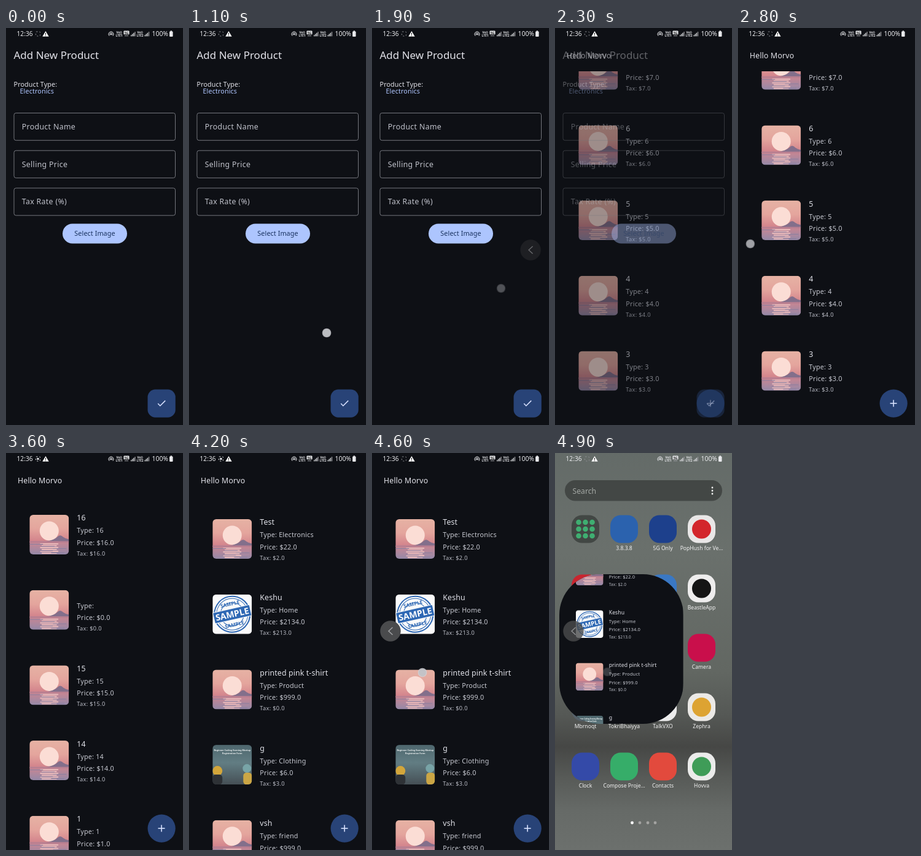
An HTML page with a canvas that plays this animation: 288x642 px, repeating every 5 s.

```html
<!DOCTYPE html>
<html lang="en">
<head>
<meta charset="utf-8">
<title>Product list</title>
<style>
html, body { margin: 0; width: 100%; height: 100%; overflow: hidden; background: #0e1015; }
canvas { display: block; width: 288px; height: 642px; }
</style>
</head>
<body>
<canvas id="stage"></canvas>
<script>
const W = 288, H = 642, LOOP = 5000, BG = '#0e1015';
const canvas = document.getElementById('stage');
const c = canvas.getContext('2d');
const dpr = window.devicePixelRatio || 1;
canvas.width = W * dpr;
canvas.height = H * dpr;

const numbered = n => [String(n), String(n), n, n];
const products = [
  ['Test', 'Electronics', 22, 2, 'sunset'],
  ['Keshu', 'Home', 2134, 213, 'stamp'],
  ['printed pink t-shirt', 'Product', 999, 0],
  ['g', 'Clothing', 6, 3, 'poster'],
  ['vsh', 'friend', 999, 9],
  ...[21, 20, 19, 18, 17, 16].map(numbered),
  ['', '', 0, 0],
  ...[15, 14, 1, 13, 12, 11, 10, 9, 8, 7, 6, 5, 4, 3, 2].map(numbered)
];
const ROW = 121.7, FIRST = 107;

// Tracks: [time, value, ...]
const scrollTrack = [[2800, 2627], [2950, 2540], [3600, 1224], [4200, 0]];
const touches = [
  [[1000, 272, 497, .5], [1100, 224, 493, .8], [1400, 208, 468, .8], [1800, 210, 421, .8], [1900, 210, 421, .2], [2000, 210, 421, 0]],
  [[2700, 20, 349, .3], [2800, 20, 349, .55], [2950, 21, 436, .7], [3100, 22, 480, 0]],
  [[4300, 5, 360, .6], [4400, 45, 358, .8], [4600, 82, 355, .8], [4800, 85, 354, .4], [4900, 85, 354, .13]]
];
const arrows = [
  [[1100, 290, 431, 0], [1300, 260, 415, 1], [1800, 258, 359, 1], [1900, 258, 359, .55], [2000, 270, 359, 0]],
  [[4300, 4, 296, .2], [4400, 18, 292, .8], [4600, 30, 288, 1], [4900, 30, 288, .8]]
];
const closing = [[4700, 0], [4800, .45], [4900, 1]];

const clamp = v => Math.max(0, Math.min(1, v));
const mix = (a, b, p) => a + (b - a) * p;

function sample(track, t) {
  let i = 1;
  while (i < track.length - 1 && t > track[i][0]) i++;
  const a = track[i - 1], b = track[i];
  const p = clamp((t - a[0]) / (b[0] - a[0]));
  return a.slice(1).map((v, k) => mix(v, b[k + 1], p));
}

function text(s, x, y, size, color, spacing = 0, weight = 400, align = 'left') {
  c.font = `${weight} ${size}px "Noto Sans", "Open Sans", sans-serif`;
  c.letterSpacing = spacing + 'px';
  c.textAlign = align;
  c.fillStyle = color;
  c.fillText(s, x, y);
}

function box(x, y, w, h, r) {
  c.beginPath();
  c.roundRect(x, y, w, h, r);
}
function fillBox(x, y, w, h, r, color) {
  box(x, y, w, h, r);
  c.fillStyle = color;
  c.fill();
}
function disc(x, y, r, color) {
  c.beginPath();
  c.arc(x, y, r, 0, 7);
  c.fillStyle = color;
  c.fill();
}
function line(points, color, width) {
  c.beginPath();
  points.forEach(([x, y]) => c.lineTo(x, y));
  c.strokeStyle = color;
  c.lineWidth = width;
  c.stroke();
}
function poly(points, color) {
  c.beginPath();
  points.forEach(([x, y]) => c.lineTo(x, y));
  c.fillStyle = color;
  c.fill();
}
function vertical(h, stops) {
  const g = c.createLinearGradient(0, 0, 0, h);
  stops.forEach(([at, color]) => g.addColorStop(at, color));
  return g;
}

function signal(x) {
  for (let i = 0; i < 4; i++) {
    c.fillStyle = i < 3 ? '#d8d9db' : '#8d8e92';
    c.fillRect(x + i * 2.1, 11.4 - i * 1.8, 1.4, 2 + i * 1.8);
  }
}

function statusBar(focused) {
  const ink = '#e8e9ec';
  text('12:36', 17.5, 13.2, 10.2, ink);
  c.setLineDash([2, 3]);
  box(48.5, 6, 7, 7, 1);
  c.strokeStyle = focused ? ink : '#8d8e92';
  c.lineWidth = 1;
  c.stroke();
  c.setLineDash([]);
  if (focused) disc(52, 9.5, 1.8, ink);
  poly([[64.5, 5], [69.7, 13.8], [59.3, 13.8]], '#fff');
  c.fillStyle = '#111';
  c.fillRect(64, 8, 1, 3);
  c.fillRect(64, 12, 1, 1);

  for (const r of [4, 2]) {
    c.beginPath();
    c.arc(171, 10, r, 2.4, 7.02);
    c.strokeStyle = ink;
    c.lineWidth = 1;
    c.stroke();
  }
  disc(171, 10.2, 1, ink);
  for (const [x, n] of [[184, 1], [218, 2]]) {
    text('Vo))', x, 9, 4.8, ink, 0, 600, 'center');
    text('LTE' + n, x, 13.6, 4.8, ink, 0, 600, 'center');
  }
  fillBox(191.5, 4.5, 9, 6, 1, ink);
  text('5G', 196, 9.5, 5.2, '#222', 0, 700, 'center');
  line([[193, 12.7], [199, 12.7]], '#999a9e', 1);
  signal(203);
  signal(225.5);
  text('100%', 237.5, 13.2, 10.4, ink);
  fillBox(266, 5.5, 5.5, 8.5, 1, ink);
  c.fillRect(267.5, 4.4, 2.5, 1.5);
}

function fab(round) {
  fillBox(230.5, 584.5, 45.2, 45.2, round ? 22.6 : 12.4, '#284377');
  if (round) {
    line([[247.5, 607], [258.5, 607]], '#d9e2ff', 1.6);
    line([[253, 601.5], [253, 612.5]], '#d9e2ff', 1.6);
  } else {
    line([[247.2, 607.3], [250.8, 611], [259.2, 602.6]], '#d9e2ff', 1.5);
  }
}

function formScreen(alpha) {
  c.globalAlpha = alpha;
  c.fillStyle = BG;
  c.fillRect(0, 0, W, H);
  text('Add New Product', 12.5, 50, 17, '#e2e2e9');
  text('Product Type:', 12.5, 94.6, 10.8, '#e2e2e9', .1);
  text('Electronics', 22.5, 105.6, 10.8, '#b0c6ff', .1);
  ['Product Name', 'Selling Price', 'Tax Rate (%)'].forEach((label, i) => {
    const y = 137.5 + i * 60.7;
    box(13, y, 262.5, 44.2, 3.2);
    c.strokeStyle = '#74767d';
    c.lineWidth = 1;
    c.stroke();
    text(label, 25.7, y + 26.5, 12.35, '#bfc1ca', .33);
  });
  fillBox(92, 316.5, 105, 32, 16, '#adc5fe');
  text('Select Image', 144.5, 336.3, 10.8, '#19325f', .08, 500, 'center');
  fab(false);
  c.globalAlpha = 1;
}

const art = {
  sunset() {
    c.fillStyle = vertical(64, [[0, '#e6b2a4'], [.35, '#e4a59d'], [.64, '#d4868d'], [.68, '#c98692'], [1, '#9589a8']]);
    c.fillRect(0, 0, 64, 64);
    disc(32, 26, 15.5, '#fbddd5');
    c.beginPath();
    c.moveTo(27, 43);
    c.quadraticCurveTo(40, 41, 46, 35);
    c.quadraticCurveTo(50, 31, 55, 36);
    c.quadraticCurveTo(59, 39, 64, 39.5);
    c.lineTo(64, 43);
    c.fillStyle = '#836f8b';
    c.fill();
    c.fillStyle = '#b97f91';
    c.fillRect(0, 42.5, 64, 2.5);
    for (let i = 0; i < 6; i++) {
      const w = 30 - i % 2 * 5;
      fillBox(32 - w / 2, 46 + i * 3, w, 2, 1, '#eabbbb');
    }
    for (let i = 0; i < 5; i++) {
      fillBox(i * 19 % 41, 47 + i * 3.5, 22, 1, .5, '#8a7f9f');
    }
  },
  stamp() {
    const blue = '#2e68b4';
    c.fillStyle = '#fafafa';
    c.fillRect(0, 0, 64, 64);
    c.translate(32, 32);
    c.rotate(-.22);
    for (const [r, w] of [[29, 2], [25.5, 1], [19, 1]]) {
      c.beginPath();
      c.arc(0, 0, r, 0, 7);
      c.strokeStyle = blue;
      c.lineWidth = w;
      c.stroke();
    }
    text('SAMPLE', 0, -14, 8, blue, 0, 800, 'center');
    text('SAMPLE', 0, 20, 8, blue, 0, 800, 'center');
    fillBox(-31, -9.5, 62, 19, 1, '#fafafa');
    fillBox(-30, -8.5, 60, 17, 1, blue);
    text('SAMPLE', 0, 5, 14, '#fff', 0, 800, 'center');
  },
  poster() {
    c.fillStyle = vertical(64, [[0, '#4e676e'], [.45, '#627d83'], [1, '#454f55']]);
    c.fillRect(0, 0, 64, 64);
    disc(8, 42, 8, '#d3a63b');
    disc(56, 38, 7, '#78a4a7');
    fillBox(0, 48, 16, 16, 5, '#2e3236');
    fillBox(50, 45, 14, 19, 5, '#cba645');
    text('Beginner Coding Evening Meetup', 32, 9.5, 3.6, '#eef2f2', 0, 600, 'center');
    text('Registration Form', 32, 15, 3.6, '#eef2f2', 0, 600, 'center');
  }
};

function row([title, type, price, tax, kind = 'sunset'], y) {
  c.save();
  c.translate(38.3, y);
  box(0, 0, 64, 64, 6);
  c.clip();
  art[kind]();
  c.restore();
  const x = 115.3;
  text(title, x, y + 9.4, 12.35, '#e0e1e8', .12, 500);
  text('Type: ' + type, x, y + 29.4, 10.8, '#c6c8d0', .19);
  text(`Price: $${price}.0`, x, y + 48.7, 10.8, '#c6c8d0', .19);
  text(`Tax: $${tax}.0`, x, y + 65.7, 9.27, '#babcc5', .31);
}

function listScreen(scroll) {
  c.fillStyle = BG;
  c.fillRect(0, 0, W, H);
  text('Hello Morvo', 19, 48.6, 12.35, '#e2e2e9', .15);
  c.save();
  c.beginPath();
  c.rect(0, 70, W, H - 70);
  c.clip();
  products.forEach((p, i) => {
    const y = FIRST + i * ROW - scroll;
    if (y > -10 && y < H) row(p, y);
  });
  c.restore();
  fab(true);
}

// Column, row, tile colour, label, inner disc colour
const apps = [
  [1, 0, '#2b62ae', '3.8.3.8'],
  [2, 0, '#1d408c', '5G Only'],
  [3, 0, '#e9e7e7', 'PopHush for Ve...', '#d3262c'],
  [0, 1, '#c9252f', ''],
  [2, 1, '#3a78c4', ''],
  [3, 1, '#eeeded', 'BeastleApp', '#151515'],
  [3, 2, '#c90f4b', 'Camera'],
  [0, 3, '#56616a', 'Mbrnoqt'],
  [1, 3, '#3a4a50', 'TokriBhaiyya'],
  [2, 3, '#ececec', 'TalkVXO'],
  [3, 3, '#ebe9e6', 'Zephra', '#dda332'],
  [0, 4, '#344aa8', 'Clock'],
  [1, 4, '#36ad69', 'Compose Proje...'],
  [2, 4, '#e24a3d', 'Contacts'],
  [3, 4, '#ebebea', 'Hovva', '#3f9c58']
];

function homeScreen() {
  c.fillStyle = vertical(H, [[0, '#646b68'], [.25, '#6a706c'], [.55, '#626762'],
    [.66, '#555855'], [.74, '#464745'], [.82, '#585b58'], [.9, '#666a67'], [1, '#6c706d']]);
  c.fillRect(0, 0, W, H);
  fillBox(16, 44, 256, 33.5, 16.7, '#434745');
  text('Search', 28.5, 65.6, 12.2, '#a4a8a5');
  [56, 61, 66].forEach(y => disc(256, y, 1.4, '#f2f2f2'));

  fillBox(27, 100.5, 45, 45, 17, '#424744');
  for (let i = 0; i < 9; i++) {
    disc(38.5 + i % 3 * 11, 112 + Math.floor(i / 3) * 11, 4.3, '#3fae71');
  }
  for (const [col, line, tile, label, inner] of apps) {
    const x = 49.5 + col * 63, y = 123 + line * 96;
    fillBox(x - 22.5, y - 22.5, 45, 45, 17, tile);
    if (inner) disc(x, y, 15.5, inner);
    text(label, x, y + 34.3, 8.6, '#f3f3f3', 0, 500, 'center');
  }
  [125.5, 138, 151, 163].forEach((x, i) => disc(x, 598, 2.4, i ? '#a3a3a1' : '#fff'));
}

function shrinkingList(p) {
  homeScreen();
  c.save();
  box(mix(0, 7, p), mix(0, 196, p), mix(W, 202, p), mix(H, 242, p), 66 * p);
  c.clip();
  c.translate(mix(0, 7, p), mix(0, 94.2, p));
  c.scale(mix(1, .7, p), mix(1, .7, p));
  listScreen(0);
  c.restore();
}

function overlays(t) {
  const active = tr => t >= tr[0][0] && t <= tr[tr.length - 1][0];
  for (const track of arrows.filter(active)) {
    const [x, y, a] = sample(track, t);
    c.globalAlpha = a;
    disc(x, y, 16.7, x > 144 ? '#2c2d31' : '#4a4b4d');
    line([[x + 3.5, y - 6], [x - 3, y], [x + 3.5, y + 6]], '#a5a6a9', 1.4);
  }
  for (const track of touches.filter(active)) {
    const [x, y, a] = sample(track, t);
    c.globalAlpha = a;
    disc(x, y, 7.3, '#d4d5da');
    disc(x, y, 6.2, '#bfc0c4');
  }
  c.globalAlpha = 1;
}

function draw(t) {
  c.setTransform(dpr, 0, 0, dpr, 0, 0);
  if (t > 4700) {
    shrinkingList(sample(closing, t)[0]);
  } else {
    // The form fades away, slowing towards the end.
    const left = clamp((2600 - t) / 700);
    const fade = left * left * (3 - 2 * left);
    if (fade < 1) listScreen(sample(scrollTrack, t)[0]);
    if (fade > 0) formScreen(fade);
  }
  statusBar(t >= 3400 && t < 4600);
  overlays(t);
}

// Ten pictures a second; every sixth one repeats the one before.
const start = performance.now();
function loop(now) {
  let step = Math.floor(Math.max(0, now - start) % LOOP / 100);
  if (step % 6 === 3) step--;
  draw(step * 100);
  requestAnimationFrame(loop);
}
loop(start);
</script>
</body>
</html>
```
